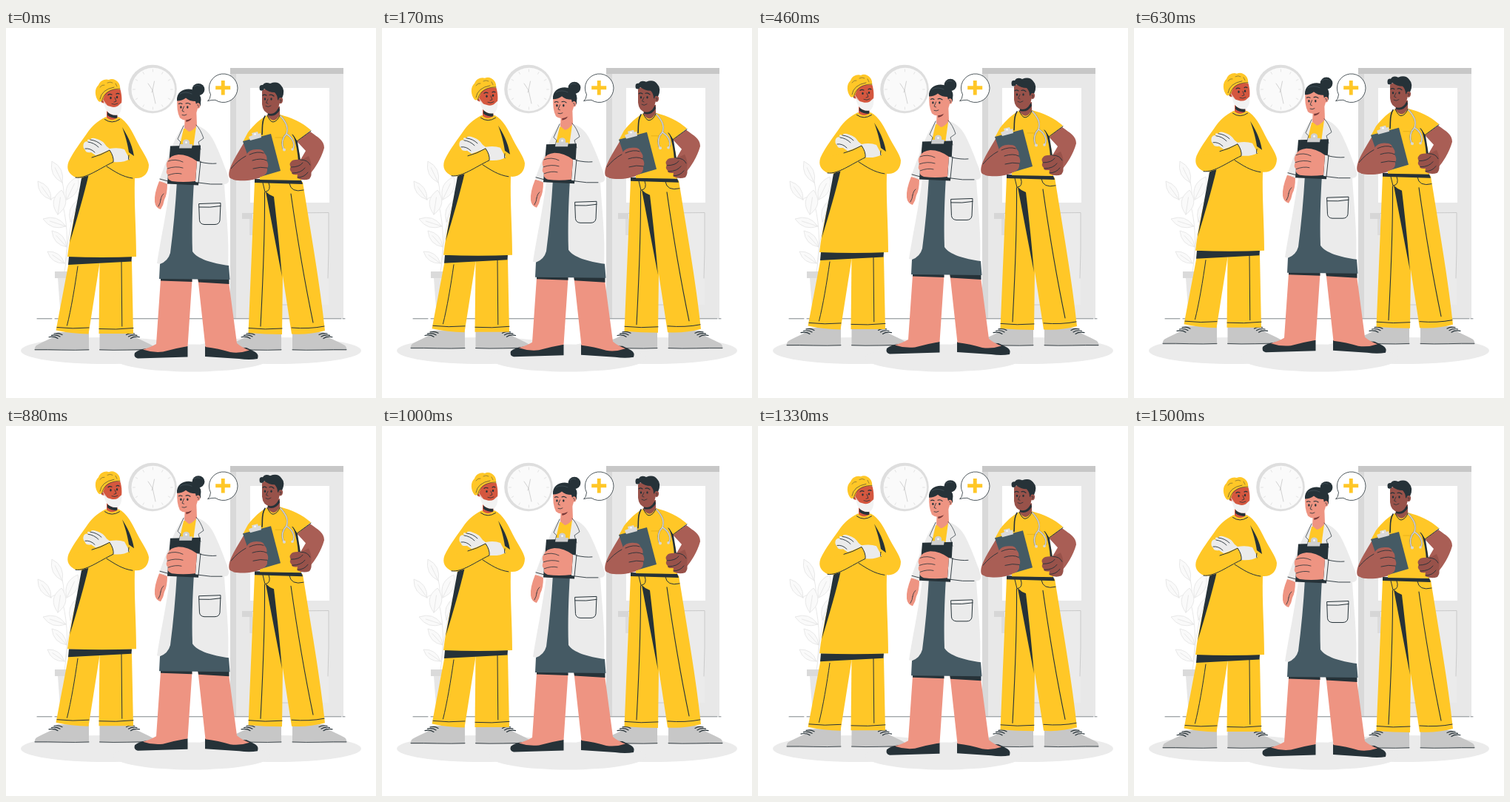
Write an HTML page with a canvas that moves like this. It is 500x500 px and loops after 1.54 s.

```html
<!DOCTYPE html>
<html lang="en">
<head>
<meta charset="utf-8">
<title>Medical team</title>
<style>
html, body { margin: 0; width: 100%; height: 100%; overflow: hidden; background: #fff; }
canvas { display: block; width: 500px; height: 500px; }
</style>
</head>
<body>
<canvas id="stage" width="500" height="500"></canvas>
<script>
const ctx = document.getElementById('stage').getContext('2d');
const LOOP = 1540, RATE = 24, BOB = 1500, RISE = 10, LEAD = 20;
const YELLOW = '#ffc727', DARK = '#263238', SLATE = '#455a64';
const PALE = '#ebebeb', GREY = '#c7c7c7';
const ROSE = '#ee9482', RUST = '#d4573f', BROWN = '#a95e55', UMBER = '#98524a';

const paths = new Map();
function path(d) {
  if (!paths.has(d)) paths.set(d, new Path2D(d));
  return paths.get(d);
}
function fill(color, d) {
  ctx.fillStyle = color;
  ctx.fill(path(d));
}
function line(d, width = 1, color = DARK) {
  ctx.strokeStyle = color;
  ctx.lineWidth = width;
  ctx.stroke(path(d));
}
function box(color, x, y, w, h) {
  ctx.fillStyle = color;
  ctx.fillRect(x, y, w, h);
}
function oval(color, x, y, rx, ry = rx, turn = 0) {
  ctx.fillStyle = color;
  ctx.beginPath();
  ctx.ellipse(x, y, rx, ry, turn, 0, Math.PI * 2);
  ctx.fill();
}

function drawDoor() {
  box('#e8e8e8', 303, 54, 153, 338);
  fill('#d9d9d9', 'M303 54L311 62V392H303Z');
  box(GREY, 303, 54, 153, 8);
  box('#fff', 330, 81, 107, 155);
  box(PALE, 331, 250, 105, 124);
  line('M331 250.5L436 249.5V300L435 338M331 374H400', 0.9, GREY);
  box('#d6d6d6', 319, 250, 14, 8);
  box('#dcdcdc', 329, 258, 5, 22);
}

function drawClock() {
  oval('#dedede', 198, 82.5, 32.8);
  oval('#fafafa', 198.8, 83, 29.3);
  for (let i = 0; i < 12; i++) {
    const a = i * Math.PI / 6, c = Math.cos(a), s = Math.sin(a);
    ctx.strokeStyle = '#dadada';
    ctx.lineWidth = 0.7;
    ctx.beginPath();
    ctx.moveTo(198.5 + 24 * c, 83 + 24 * s);
    ctx.lineTo(198.5 + 27 * c, 83 + 27 * s);
    ctx.stroke();
  }
  line('M192 75L198 84L202 102M200.5 72L198 84L197 87', 0.6, '#b5b5b5');
}

function leaf(x, y, tipX, tipY, bulge = 0.38) {
  const dx = tipX - x, dy = tipY - y, nx = -dy * bulge, ny = dx * bulge;
  const mx = x + dx * 0.5, my = y + dy * 0.5;
  ctx.beginPath();
  ctx.moveTo(x, y);
  ctx.quadraticCurveTo(mx + nx, my + ny, tipX, tipY);
  ctx.quadraticCurveTo(mx - nx, my - ny, x, y);
  ctx.moveTo(x, y);
  ctx.lineTo(x + dx * 0.7, y + dy * 0.7);
  ctx.fillStyle = '#fafafa';
  ctx.fill();
  ctx.strokeStyle = '#e6e6e6';
  ctx.lineWidth = 0.9;
  ctx.stroke();
}

function drawPlant() {
  line('M79 330C84 300 84 270 77 240Q72 222 60 232M77 240Q80 222 76 208M80 318Q86 265 96 232', 0.9, '#e6e6e6');
  leaf(76, 209, 62, 180);
  leaf(61, 232, 43, 207);
  leaf(70, 252, 75, 219, 0.5);
  leaf(82, 232, 97, 201, 0.42);
  leaf(81, 268, 50, 258);
  leaf(82, 296, 62, 274);
  leaf(79, 318, 56, 302);
  leaf(87, 262, 98, 232);
  fill('#e6e6e6', 'M70 338H91L88 392H74Z');
  box('#dadada', 66, 329, 29, 9);
}

function drawRoom() {
  ctx.fillStyle = '#fff';
  ctx.fillRect(0, 0, 500, 500);
  oval(PALE, 135, 436, 115, 18);
  oval(PALE, 365, 436, 115, 18);
  oval(PALE, 251, 446, 106, 18.5);
  drawDoor();
  drawClock();
  drawPlant();
  line('M42 392.8H62M66 392.8H453M455 392.8H458', 0.6);
}

function drawShoe(x, side) {
  ctx.save();
  ctx.translate(x, 0);
  ctx.scale(side, 1);
  fill(GREY, 'M0 411H42C46 415 48 418 53 420C59 423 66 426 71 429Q74 432 73 436H0Z');
  line('M0 434.7C25 436.2 50 434 73 434.6', 0.8);
  line('M36 414.5Q41 411.5 47 413M39 417Q44 413.8 50.5 415.3M42 419.5Q47 416 54 417.7', 1.2);
  ctx.restore();
}

function drawSurgeon() {
  drawShoe(112, -1);
  drawShoe(126.5, 1);
  fill(YELLOW, 'M85 316L127 315L111.5 413.5Q88 413 67.5 408.5Z');
  fill(YELLOW, 'M126.5 315H170L172 413H125.5Z');
  fill(DARK, 'M85 309H170L169.5 315.5L84 320Z');
  line('M97 322C93 350 88 380 82.5 402M156 316L156.8 403M69 404.5Q90 407 112 405M126 406.5Q148 408 172 405.5');

  fill(RUST, 'M136 104L150 110L151 126Q143 132 136 122Z');
  fill(DARK, 'M137 113Q143 119 150 117L150.5 122Q142 122 137 118Z');
  fill(YELLOW, 'M135 120C122 127 116 133 111 140C102 153 91 167 84.5 181C81 191 85 198 95 202L104 203C96 240 87 275 83 309Q130 311 176 309C176 273 173 237 174 203C186 204 193 196 193 185C192 177 183 165 177 153C170 139 164 126 152 120Q143 128 135 120Z');
  line('M133.5 123.5Q143 130.5 153.5 123.5');
  fill(DARK, 'M102 203L112 197C106 223 96 258 86 290Z');
  fill(DARK, 'M157 134C163 144 170 155 173 173L166 168C164 155 161 145 157 134Z');

  fill(PALE, 'M135 168L140 163Q152 161 160 164L167 177Q160 182 145 181Z');
  fill(PALE, 'M105 156Q107 152 111 154Q108 149 114 151Q115 147 123 150Q131 152 136 160L145 167L133 179Q123 174 115 168Q108 169 107 165Q103 161 105 156Z');
  line('M111 154Q119 155 125 161M114 151Q123 152 129 158M107 163Q114 162 120 168', 0.9);
  fill(YELLOW, 'M92 180C108 178 125 171 140 165Q146 173 145 181C130 189 112 204 95 202C84 198 84 187 92 180Z');
  line('M94 202C108 204 126 190 145 181Q146 174 140 165Q128 172 116 175');
  line('M136 187C147 194 157 201 171 203M166 172Q165 177 166 178');

  fill(RUST, 'M131 96C130 88 138 82 154 82C157 90 157 101 155 106C151 112 140 113 136 109Z');
  fill(RUST, 'M133 95Q127 92 128 98Q130 103 134 101Z');
  fill('#f2f2f2', 'M132 99Q135 105 141 106Q147 108 151 105.5L156 101C157 109 155 115 151 117.5Q142 119 136 112Q133 107 132 99Z');
  line('M131 97L136 104', 0.7, '#f2f2f2');
  fill(YELLOW, 'M125 99C120 93 119 82 125 77C127 71 134 68 139 70C146 66 156 74 154 83Q142 81 134 89L131 97Q128 101 125 99Z');
  line('M129.5 100C130 91 138 82 154 82M127 96Q129 83 146 80', 0.6);
  line('M127 80Q130 76 133 77M137 74Q141 72 144 74M148 75L150 79', 0.45);
  oval(DARK, 141.5, 94.5, 1.2, 1.7);
  oval(DARK, 150, 93.5, 1.2, 1.7);
  line('M138 90.5Q140 88.5 143 90M149 89Q151 87.5 153 89', 1.2);
  line('M147 94L149 99L146 100M143 102.5Q147 104.5 151 102', 0.8);
}

function drawNurse() {
  drawShoe(372, -1);
  drawShoe(387, 1);
  fill(YELLOW, 'M336 207L401 208C411 271 425 350 431 409Q409 415 386 413.5L374 335L373 414Q350 414 327.5 412Z');
  fill(DARK, 'M336 204L399 205.5L401 211L336 209Z');
  fill(DARK, 'M351 221Q356 226 362 228C365 254 369 286 373 336Q361 274 351 221Z');
  line('M349.5 222C350 282 347 345 344 403M385 224C393 280 405 350 415 398', 1.1);
  line('M355 209Q359 220 350 221.5L347 209M383 210Q385 223 402 219M328 405.5Q350 408 373 406M386 405Q410 407 430 403');

  fill(BROWN, 'M411 140C422 148 430 152 430 162C426 177 417 190 411 197L398 178L405 166L393 153Z');
  fill(BROWN, 'M326 147L345 158L350 200C331 208 308 208 302 202C298 190 313 171 326 147Z');
  fill(UMBER, 'M355 108L370 106L370 121Q362 132 353 119Z');
  fill(DARK, 'M354 113Q362 116 369 107L370 111Q364 121 354 118Z');
  fill(YELLOW, 'M353 118C344 122 335 131 327 141L320 154L343 167V205L399 206L397 172L393 154L412 138C401 128 386 121 370 117Q362 132 353 118Z');
  line('M353 118Q357 127 361 127Q367 126 370 118M393 153L412 139M393 153L387 144');
  fill(DARK, 'M388 144L394 154L398 179L395 181Q394 162 388 144Z');
  line('M364 148H377', 0.7, '#e0a915');
  line('M350 119C345 127 347 134 346 144', 1.6);
  const tube = 'M371 119C379 128 382 135 379 143C373 149 372 156 375 164M379 143C387 148 391 156 388 163';
  line(tube, 2, '#7d7d70');
  line(tube, 1.4, '#d8d8d8');
  oval('#d8d8d8', 376, 164.5, 2);
  oval('#d8d8d8', 387, 164, 1.8);

  fill(SLATE, 'M320 153L358 143L371 193L337 203Z');
  fill('#dadada', 'M328 147L333 145L332 142L340 140L341 143L344 142L345 148L330 152Z');
  oval('#fff', 336.5, 143.5, 1.2);
  fill(BROWN, 'M307 185L325 171Q329 163 341 164Q348 164 349 169Q354 174 352 179Q356 185 353 190Q354 197 347 200Q329 208 307 205Z');
  line('M329 171Q340 166 348 169M333 179Q345 175 352 179M334 190Q344 187 353 189M304 190Q313 179 324 173', 0.9);
  fill(UMBER, 'M385 181Q387 177 399 178L409 173Q414 183 412 192Q414 199 410 204Q402 207 394 203Q393 200 394 198Q386 199 386 195Q382 191 385 188Q382 184 385 181Z');
  line('M385 188Q397 188 401 182M387 196Q399 196 404 189M394 202Q403 202 408 195M398 178Q408 178 411 185', 0.9);

  fill(UMBER, 'M346 85Q353 78 369 86L370 99Q368 116 357 116Q347 115 346 103Z');
  fill(DARK, 'M343 84Q341 76 347 77Q350 72 357 75Q367 71 372 78Q378 84 373 95L371 100L367 97Q367 91 363 87Q355 87 349 82Q348 86 343 84Z');
  oval(UMBER, 371, 98, 3, 4, 0.2);
  line('M370 97Q373 96 371 100', 0.7);
  oval(DARK, 350, 96, 1.2, 1.7);
  oval(DARK, 358.5, 96, 1.2, 1.7);
  line('M347 91Q349 89 352 91M356 90.5Q359 89 362 92', 1.2);
  line('M354 96L351.5 101L354 102M351 105.5Q354 108 358 105', 0.8);
}

function drawDoctorLegs() {
  fill(DARK, 'M174 439Q180 434 190 433L245.5 430V444.5L178 446.5Q172 445 174 439Z');
  fill(DARK, 'M269 430L325 432Q332 435 337 438Q342 441 340 447Q329 449 315 447L269 444Z');
  fill(ROSE, 'M209 340H251.5L245.5 430Q228 433 212 437.5Q198 439 185 434.5Q196 431 203 427Z');
  fill(ROSE, 'M259.5 340L301 343L312 426Q319 432 329 435.5Q316 440 303 438Q287 433 269.5 431Z');
  fill(DARK, 'M209 338H251.5V343L209 341.5Z');
  fill(DARK, 'M259 338H301.5V346L260 343.5Z');
}

function drawDoctorCoat() {
  fill(ROSE, 'M207 207L218 210Q218 225 214 232Q213 239 209 245Q202 243 201 235Q200 224 207 207Z');
  line('M209 232Q210 226 213 224M206 241Q209 236 209 232', 0.8);
  fill(PALE, 'M241 131C229 143 219 175 207 206L218 211L222 210C217 250 209 285 204 318L213 320L300 323C302 282 297 247 295 211Q302 211 301 204C296 187 289 170 282 155C276 142 269 136 257 131Z');
  fill(SLATE, 'M231 207H254C252 240 251 270 252 302C258 312 279 318 301 321L302.5 340L207 339L208 319Q219 315 222 304Q228 258 231 207Z');
  fill(YELLOW, 'M240 136L257 133L253 162H234Z');
  fill(ROSE, 'M242 116L257 104L258 132Q251 140 247 140L241 135Z');
  fill('#7a3b3a', 'M243 123Q248 122 252 118Q252 125 243.5 127Z');
  line('M240 132L232 150L236 154L233 163M257 131Q263 137 267 149L260 154L263 164', 0.7);
  line('M208 204L219 207', 0.9);
  line('M261 237.5L290 236.5L289 260Q288 265.5 282 265.5H268Q262 265 261.5 260ZM261 242Q276 243 290 240.5', 1);
}

function drawDoctorBoard() {
  fill(DARK, 'M222 159.5L263 158.5L260 212.5L218 210.5Z');
  fill('#cfcfcf', 'M235 157H239Q238 150.5 243.5 150.5Q249 150.5 248 157H252L251 162.5H234Z');
  oval('#f5f5f5', 243.5, 154.5, 1.5);
  fill(PALE, 'M258 180L287 184Q301 190 300 206Q298 212 280 212L256 208Z');
  line('M263 180L260 209M262 181Q275 184 284 183M260 209Q277 212 292 211', 0.9);
  fill(ROSE, 'M219 179Q222 172 233 171Q246 171 258 180L256 207Q239 209 224 207Q217 204 219 199Q215 195 218 190Q215 184 219 179Z');
  line('M219 180Q229 176 239 181M218 190Q229 186 239 189M219 199Q229 195 237 197', 0.8);
}

function drawDoctorHead() {
  fill(ROSE, 'M231.5 94Q245 84 258 95L259.5 106Q258 117 251 122Q241 127 235 121.5Q230 112 231.5 94Z');
  oval(DARK, 260, 83, 8.4, 8.1);
  fill(DARK, 'M231 98.5C230 88 238 82.5 247 82.5Q255 83 259 87Q265 93 263 101Q264 106 260 107Q257 105 256 99Q248 99 243 94.5Q238 98.5 231 98.5Z');
  line('M235 89Q243 85 251 89M254 79Q258 76 262 78', 0.5, '#52636c');
  oval(ROSE, 259.5, 105, 2.8, 3.7);
  line('M258.5 104Q261 103 260 107', 0.7);
  oval(DARK, 236.4, 107, 1.2, 1.7);
  oval(DARK, 245.3, 107, 1.2, 1.7);
  line('M233.5 102.5Q235.5 101 238 102.5M243 102Q246 100.5 249 103', 1.1);
  line('M240.5 106L238 112L240.5 113M238 117.5Q241 119 244 117', 0.8);
}

function drawBubble() {
  const d = 'M273 98.5Q276 96 276.5 90A19.3 19.3 0 1 1 283 97.3Q278 97 273 98.5Z';
  fill('#fff', d);
  line(d, 0.8);
  box(YELLOW, 283.2, 78.3, 20, 4.9);
  box(YELLOW, 290.8, 71, 4.9, 19.5);
}

// Linear rise and fall, sampled on the loop's frame clock.
function lift(ms) {
  const step = Math.floor((ms % LOOP + 5) * RATE / 1000);
  const phase = (step * 1000 / RATE + LEAD) % BOB / BOB;
  return RISE * (1 - Math.abs(1 - 2 * phase));
}

function draw(ms) {
  ctx.lineCap = ctx.lineJoin = 'round';
  drawRoom();
  ctx.save();
  ctx.translate(0, 0.3 - lift(ms));
  drawSurgeon();
  drawNurse();
  drawDoctorLegs();
  drawDoctorCoat();
  drawDoctorBoard();
  drawDoctorHead();
  ctx.restore();
  drawBubble();
}

let start;
function tick(now) {
  start ??= now;
  draw(Math.max(0, now - start));
  requestAnimationFrame(tick);
}
draw(0);
requestAnimationFrame(tick);
</script>
</body>
</html>
```
